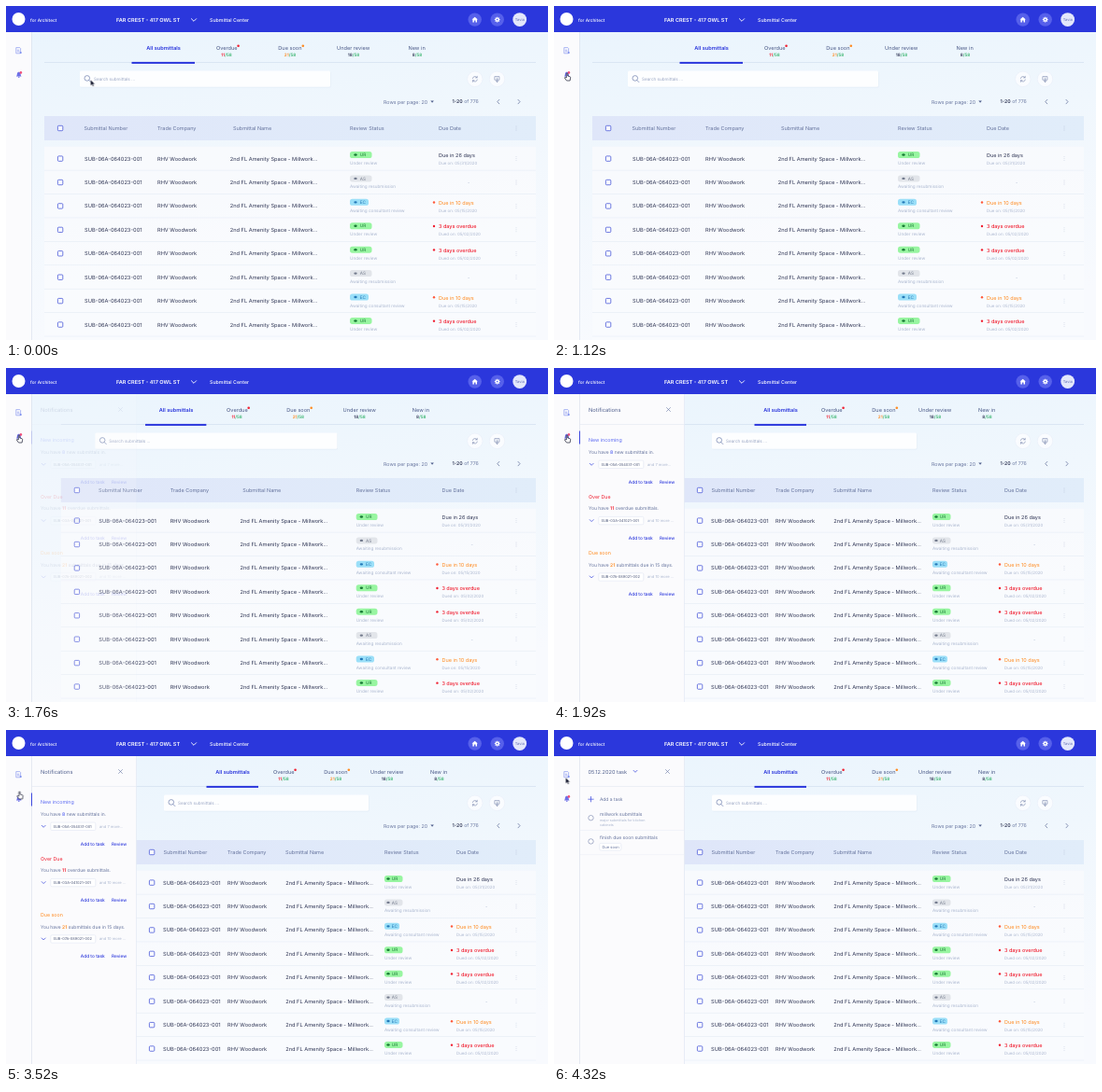
These frames come from a looping animation (580x358 px, 4400 ms). An HTML page:

```html
<!DOCTYPE html>
<html lang="en">
<head>
<meta charset="utf-8">
<title>Submittal dashboard</title>
<style>
@property --p { syntax: '<number>'; inherits: true; initial-value: 0; }
html, body { margin: 0; width: 100%; height: 100%; overflow: hidden; background: #f8fafe; }
svg { display: block; width: 100%; height: 100%; font-family: Inter, Roboto, sans-serif;
  text-rendering: geometricPrecision; animation: open 4.4s infinite; }
text { white-space: pre; }

/* --p runs from 0 (side panel closed) to 1 (open) */
.move { transform: translateX(calc(var(--p) * var(--d) * 1px)); }
.box { x: calc((var(--x) + var(--d) * var(--p)) * 1px);
  width: calc((var(--w) + var(--dw) * var(--p)) * 1px); }
.notes { opacity: var(--p); }
.tasks { opacity: 0; animation: tasks 4.4s linear infinite; }
.cursor { animation: point 4.4s ease-in-out infinite; }
.arrow { animation: arrow 4.4s step-end infinite; }
.hand { animation: hand 4.4s step-end infinite; }

@keyframes open {
  0% { --p: 0; }
  38.48% { --p: 0; animation-timing-function: ease-in-out; }
  43.7%, 100% { --p: 1; }
}
@keyframes tasks {
  0%, 84.5% { opacity: 0; }
  87.3%, 100% { opacity: 1; }
}
@keyframes point {
  0%, 1.8% { transform: translate(90.5px, 79px); }
  18.6%, 54.5% { transform: translate(14px, 72px); }
  63.6%, 80.9% { transform: translate(14.5px, 66px); }
  85%, 100% { transform: translate(12.5px, 51px); }
}
@keyframes arrow { 0% { opacity: 1; } 18.2% { opacity: 0; } 83.6%, 100% { opacity: 1; } }
@keyframes hand { 0% { opacity: 0; } 18.2% { opacity: 1; } 83.6%, 100% { opacity: 0; } }
</style>
</head>
<body>
<svg id="stage" viewBox="0 0 580 358"></svg>
<script>
const BLUE = '#2b37dc', INK = '#2f3554', SLATE = '#66749e', PALE = '#aab6cf',
      RED = '#f01f30', ORANGE = '#ff8a1f', GREEN = '#35b46c', PAPER = '#fbfbfd';

// Text is placed by the middle of its capitals.
const text = (x, y, size, str, fill = INK, weight = 400, anchor = 'start') =>
  `<text x="${x}" y="${y + size * .36}" font-size="${size}" fill="${fill}" font-weight="${weight}" text-anchor="${anchor}">${str}</text>`;
const rect = (x, y, w, h, fill, more = '') =>
  `<rect x="${x}" y="${y}" width="${w}" height="${h}" fill="${fill}" ${more}/>`;
const box = (x, d, w, dw, y, h, fill, more = '') =>
  `<rect class="box" style="--x:${x};--d:${d};--w:${w};--dw:${dw}" y="${y}" height="${h}" fill="${fill}" ${more}/>`;
const dot = (x, y, r, fill, more = '') => `<circle cx="${x}" cy="${y}" r="${r}" fill="${fill}" ${more}/>`;
const line = (d, stroke, width = .7) =>
  `<path d="${d}" fill="none" stroke="${stroke}" stroke-width="${width}" stroke-linecap="round" stroke-linejoin="round"/>`;
const move = (d, ...parts) => `<g class="move" style="--d:${d}">${parts.join('')}</g>`;
const chevron = (x, y, s, color, width = .8) => line(`M${x - s} ${y - s / 2}l${s} ${s}l${s} ${-s}`, color, width);
const cross = (x, y) => line(`M${x - 2} ${y - 2}l4 4m0 -4l-4 4`, '#6674a3', .6);
const check = y => rect(55.4, y - 2.7, 5.4, 5.4, '#fbfcff', 'rx=".9" stroke="#4a58d8" stroke-width=".8"');
const more = y => [-2, 0, 2].map(k => dot(546, y + k, .4, '#a7b2cb')).join('');

function header() {
  const gear = [0, 45, 90, 135].map(a =>
    `<path d="M525.7 11.7v5.8" stroke="#fff" stroke-width="1.1" transform="rotate(${a} 525.7 14.6)"/>`).join('');
  return rect(0, 0, 580, 28, BLUE) + dot(13.5, 14, 7, '#fff') +
    text(26, 15.4, 4.75, 'for Architect', '#fff', 500) +
    text(118, 15.2, 5.6, 'FAR CREST - 417 OWL ST', '#fff', 600) +
    chevron(201, 15, 2.6, '#fff', .9) +
    text(218, 15.2, 5.25, 'Submittal Center', '#fff', 500) +
    dot(501.7, 14.6, 7.2, '#5660ea') + dot(525.7, 14.6, 7.2, '#5660ea') + dot(549.7, 14.6, 7.4, '#e3e7fb') +
    '<path d="M498.5 14.6l3.2-2.9 3.2 2.9h-.9v2.8h-1.5v-1.9h-1.6v1.9h-1.5v-2.8z" fill="#fff"/>' +
    gear + dot(525.7, 14.6, 2.1, '#fff') + dot(525.7, 14.6, .8, '#5660ea') +
    text(549.7, 14.8, 4, 'Tavia', '#6470b8', 400, 'middle');
}

function sidebar() {
  return rect(0, 28, 27, 330, PAPER) + rect(27, 28, .6, 330, '#d8deec') +
    line('M14.4 44.6h-3.6v6.2h4.8v-4.9zM12.2 47.2h1.6M12.2 48.8h2', '#8b9bf0', .7) +
    dot(15.7, 50, 1.1, '#7f91ee') +
    '<path d="M10.9 75.4c1-.8.8-2 1-3 .3-2.2 3.3-2.2 3.7 0 .2 1 0 2.2 1 3z" fill="#6d70e8"/>' +
    dot(13.8, 76.2, .8, '#6d70e8') + dot(15.9, 71.4, 1.3, '#f0507c');
}

function tabs() {
  const tab = (x, d, mid, label, count, color, badge) => move(d,
    text(x, 44.5, 5.6, label, '#4b5a88'),
    text(mid, 52.7, 4.6, `<tspan fill="${color}">${count}</tspan>/58`, GREEN, 600, 'middle'),
    badge ? dot(badge, 42.8, 1.3, color) : '');
  return box(41, 98, 526, -98, 60.2, .7, '#d3e0f0') +
    box(134.5, 80, 67.5, -12, 59.9, 2, BLUE) +
    move(74, text(150.3, 44.5, 5.6, 'All submittals', BLUE, 600)) +
    tab(225, 61, 236, 'Overdue', 11, RED, 248.6) +
    tab(291.3, 49, 304, 'Due soon', 21, ORANGE, 317.8) +
    tab(354, 36, 372, 'Under review', 18, INK) +
    tab(430.5, 23.5, 440, 'New in', 8, INK);
}

function tools() {
  return box(79.5, 90, 268, -49, 70.3, 17.3, '#dde6f2', 'rx="1.5" opacity=".6"') +
    box(79, 90, 268, -49, 69.5, 17.3, '#fdfeff', 'rx="1.5"') +
    move(90, '<circle cx="86.8" cy="77.4" r="2.8" fill="none" stroke="#6b7cab" stroke-width=".7"/>',
      line('M88.9 79.6l2 2', '#6b7cab'), text(94, 78.3, 4.6, 'Search submittals ...', '#9aa6c3')) +
    dot(501.8, 78.3, 8.2, '#fafcff', 'stroke="#e4ebf6" stroke-width=".5"') +
    dot(525.5, 78.3, 8.2, '#fafcff', 'stroke="#e4ebf6" stroke-width=".5"') +
    line('M499.3 77.6a2.6 2.6 0 0 1 4.6-1M504.3 79a2.6 2.6 0 0 1-4.6 1M504.2 75.3v1.6h-1.6M499.4 81.3v-1.6h1.6', '#7683aa', .6) +
    line('M523.3 75.6h4.6v3.6h-4.6zM525.6 77v4.4M524.2 80.2l1.4 1.4 1.4-1.4', '#7683aa', .6) +
    text(404, 102.6, 5.3, 'Rows per page: 20', SLATE) +
    '<path d="M454.3 101.4h3.6l-1.8 2.3z" fill="#53628f"/>' +
    text(477.6, 102.6, 5.2, `<tspan fill="${INK}" font-weight="600">1-20</tspan> of 776`, SLATE) +
    line('M527.8 100.4l-2 2.2 2 2.2', '#5b6996') + line('M548 100.4l2 2.2-2 2.2', '#5b6996');
}

const STATUS = {
  UR: ['Under review', '#98f5a1', '#187a35', 23.5],
  AS: ['Awaiting resubmission', '#e2e5ea', '#747c8e', 23.5],
  EC: ['Awaiting consultant review', '#9bdff8', '#2379b8', 20]
};
// status, due text, due colour, date
const ROWS = [
  ['UR', 'Due in 26 days', INK, 'Due on: 05/31/2020'],
  ['AS'],
  ['EC', 'Due in 10 days', ORANGE, 'Due on: 05/15/2020'],
  ['UR', '3 days overdue', RED, 'Dued on: 05/02/2020'],
  ['UR', '3 days overdue', RED, 'Dued on: 05/02/2020'],
  ['AS'],
  ['EC', 'Due in 10 days', ORANGE, 'Due on: 05/15/2020'],
  ['UR', '3 days overdue', RED, 'Dued on: 05/02/2020']
];
const rowY = i => 163.6 + i * 25.42;
const column = draw => ROWS.map((row, i) => draw(rowY(i), row)).join('');

function table() {
  const head = (x, d, label) => move(d, text(x, 131, 5.5, label, SLATE));
  const status = (y, [code]) => {
    const [label, fill, ink, w] = STATUS[code];
    return box(368, 37, w, -4, y - 7.6, 7, fill, 'rx="2.6"') +
      move(35, `<ellipse cx="374" cy="${y - 4.1}" rx="1.7" ry="1.2" fill="${ink}"/>`) +
      move(34, text(378.8, y - 4.1, 4.7, code, ink)) +
      move(37, text(368, y + 4.8, 4.65, label, PALE));
  };
  const due = (y, [, label, color, date]) => !label ? text(494, y, 5, '-', PALE) :
    (color === INK ? '' : dot(458, y - 3.9, 1.2, color === ORANGE ? '#ff5a3c' : RED)) +
    text(463, y - 3.6, 5.5, label, color, color === RED ? 500 : 400) + text(463, y + 4.8, 4.4, date, PALE);

  return box(41, 98, 526, -98, 118, 26, 'url(#head)') +
    box(41, 98, 526, -98, 150.8, 207.2, '#fbfcfe', 'opacity=".8"') +
    ROWS.map((_, i) => box(41, 98, 526, -98, rowY(i) + 12.2, .6, '#e4ebf5')).join('') +
    move(98, check(131), column(check)) +
    head(83.5, 85, 'Submittal Number') + head(162, 75, 'Trade Company') + head(243, 56, 'Submittal Name') +
    head(368, 37, 'Review Status') + head(463, 19, 'Due Date') + more(131) +
    move(84, column(y => text(84.1, y, 5.72, 'SUB-06A-064023-001'))) +
    move(75, column(y => text(162, y, 5.68, 'RHV Woodwork'))) +
    move(59.5, column(y => text(239.7, y, 5.68, '2nd FL Amenity Space - Millwork...'))) +
    column(status) + move(19, column(due)) + column(more);
}

const panel = () => rect(27, 28, 112.5, 330, PAPER) + rect(27, 28, .6, 330, '#d8deec') +
  rect(139, 28, .6, 330, '#dfe6f2') + rect(27.5, 60.4, 111.5, .6, '#e3e8f2');

function notes() {
  const block = (y, title, color, count, rest, code, extra) =>
    text(37, y, 5.3, title, color) +
    text(37, y + 13, 5, `You have <tspan fill="${color}" font-weight="600">${count}</tspan> ${rest}`, SLATE) +
    chevron(40.2, y + 26, 2, '#4d5ae0') +
    rect(47.8, y + 21.8, 48, 8.4, '#fff', 'rx="1.2" stroke="#dbe1ef" stroke-width=".5"') +
    text(50.4, y + 26, 3.95, code, '#4b5678') +
    text(100, y + 26, 4.1, extra, PALE) +
    text(79.8, y + 44.7, 4.8, 'Add to task', BLUE, 500) + text(113, y + 44.7, 4.7, 'Review', BLUE, 500);
  return `<g class="notes">${panel()}${rect(27, 67.5, .9, 14, BLUE)}` +
    text(37, 44.6, 5.8, 'Notifications', '#53628f') + cross(122.5, 44.5) +
    block(77.3, 'New incoming', '#5b69f2', 8, 'new submittals in.', 'SUB-05A-054031-001', 'and 7 more...') +
    block(137.6, 'Over Due', RED, 11, 'overdue submittals.', 'SUB-03A-041021-001', 'and 10 more ...') +
    block(198, 'Due soon', ORANGE, 21, 'submittals due in 15 days.', 'SUB-07A-089021-002', 'and 10 more ...') + '</g>';
}

function tasks() {
  const ring = y => dot(39.5, y, 2.7, '#fff', 'stroke="#6f7da8" stroke-width=".6"');
  return `<g class="tasks">${panel()}` +
    text(36.5, 44.6, 5.6, '05.12.2020 task', '#53628f') + chevron(87, 44.3, 2, '#4d5ae0') + cross(121.5, 44.5) +
    line('M36.8 74.2h5.4M39.5 71.5v5.4', '#4d5ae0', .8) + text(49, 74.4, 4.9, 'Add a task', SLATE) +
    ring(94.2) + text(49, 90.3, 5, 'millwork submittals', SLATE) +
    text(49, 96.7, 3.7, 'major submittals for kitchen', PALE) + text(49, 101.3, 3.7, 'cabinets', PALE) +
    rect(27.5, 107, 111.5, .5, '#e6ebf4') +
    ring(119.4) + text(49, 115.6, 5, 'finish due soon submittals', SLATE) +
    rect(48.8, 121.4, 23, 7.6, '#fff', 'rx="1.2" stroke="#dbe1ef" stroke-width=".5"') +
    text(51.4, 125.3, 4.1, 'Due soon', SLATE) +
    rect(27.5, 133.6, 111.5, .5, '#e6ebf4') + '</g>';
}

const cursor = () => `<g class="cursor">
  <path class="arrow" d="M0 0v6.4l1.5-1.3 1 2.2 1.1-.5-1-2.1h2z" fill="#11142a" stroke="#fff" stroke-width=".4"/>
  <path class="hand" d="M-.7 .3q.7-.8 1.4 0v2.7l2.4.7q.7.3.6 1.1l-.6 3.2h-3.6l-2.2-3.1q.3-1 2 0z" fill="#fff" stroke="#1a1d33" stroke-width=".7"/></g>`;

document.getElementById('stage').innerHTML = `<defs>
  <linearGradient id="page" x2=".2" y2="1"><stop stop-color="#e9f4fd"/><stop offset=".45" stop-color="#f0f7fd"/><stop offset="1" stop-color="#f8fafe"/></linearGradient>
  <linearGradient id="head"><stop stop-color="#dfe6f9"/><stop offset="1" stop-color="#e1edfa"/></linearGradient></defs>` +
  rect(0, 0, 580, 358, 'url(#page)') + tabs() + tools() + table() + sidebar() +
  notes() + tasks() + header() + cursor();
</script>
</body>
</html>
```
